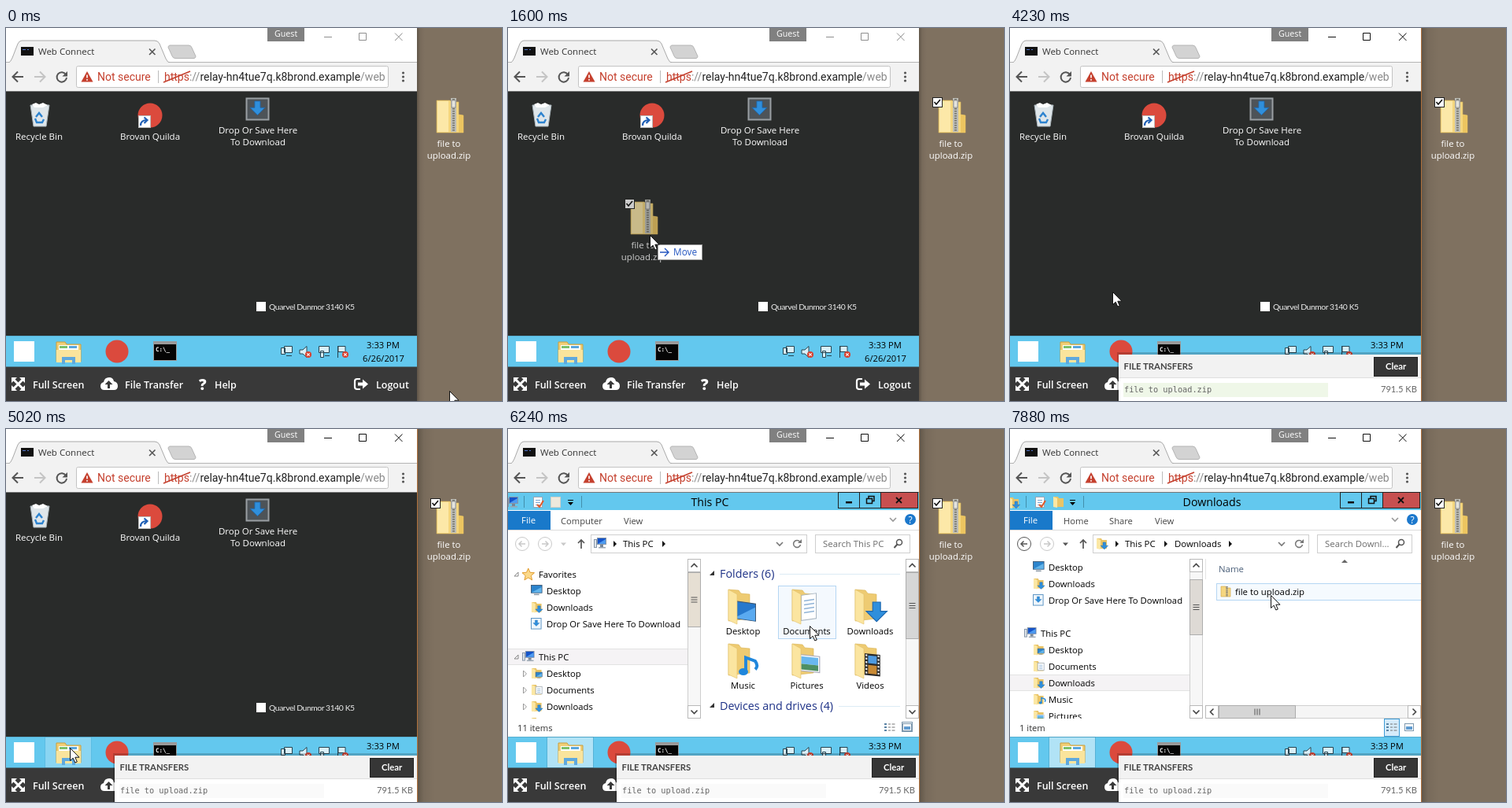
Recreate the animation shown at these times as an HTML page. Size 630 by 474 pixels, loop 8000 ms.

```html
<!DOCTYPE html>
<html lang="en">
<head>
<meta charset="utf-8">
<title>File transfer</title>
<style>
html, body { margin: 0; width: 100%; height: 100%; overflow: hidden; background: #7f7160; }
svg { display: block; width: 630px; height: 474px; }
text { font-family: "Open Sans", "Noto Sans", sans-serif; white-space: pre; }
.ui { font-family: Roboto, sans-serif; }
.lato { font-family: Lato, sans-serif; }
.mono { font-family: "DejaVu Sans Mono", monospace; }
</style>
</head>
<body>
<svg id="stage" viewBox="0 0 630 474" xmlns="http://www.w3.org/2000/svg"></svg>
<script>
const SKY = '#63c8ee', INK = '#000', DARK = '#393939';

const text = (x, y, s, fill = INK, size = 11.4, more = '') =>
  `<text x="${x}" y="${y}" fill="${fill}" font-size="${size}" ${more}>${s}</text>`;
const mid = (x, y, s, fill, size) => text(x, y, s, fill, size, 'text-anchor="middle"');
const rect = (x, y, w, h, fill, more = '') =>
  `<rect x="${x}" y="${y}" width="${w}" height="${h}" fill="${fill}" ${more}/>`;
const box = (x, y, w, h, fill, stroke, more = '') =>
  rect(x + .5, y + .5, w - 1, h - 1, fill, `stroke="${stroke}" ${more}`);
const shape = (d, fill, more = '') => `<path d="${d}" fill="${fill}" ${more}/>`;
const line = (d, stroke, w = 1, more = '') =>
  `<path d="${d}" fill="none" stroke="${stroke}" stroke-width="${w}" ${more}/>`;
const dot = (x, y, r, fill, more = '') => `<circle cx="${x}" cy="${y}" r="${r}" fill="${fill}" ${more}/>`;
const at = (x, y, s, k = 1) => `<g transform="translate(${x} ${y}) scale(${k})">${s}</g>`;
const group = (id, s, more = '') => `<g id="${id}" ${more}>${s}</g>`;

// Small pictures, drawn from their top left corner
const downArrow = shape('M5 0h6v7h5L8 15L0 7h5Z', '#2f8fdc', 'stroke="#1c66ae" stroke-width=".7"');
const note = line('M4 13V1l8 3q3 4 0 7', '#2087dc', 2.6) + `<ellipse cx="2" cy="13" rx="4" ry="3" fill="#2087dc"/>`;
const monitor = box(0, 0, 15, 11, '#2c84cc', '#44607c') + shape('M1 10L14 3V10Z', '#62b4ea') + rect(4, 12, 7, 1.5, '#8795a3');
const pc = box(4, 0, 12, 9, '#1553c8', '#8796a8') + shape('M5 8L15 2V8Z', '#4e9bf0') +
  rect(8, 9, 4, 3, '#788697') + rect(6, 12, 9, 1.5, '#9aa6b2') + box(0, 2, 4, 11, '#dfe5ea', '#8796a8');
const net = at(0, 0, pc, .9) + dot(10, 9, 5, '#3b92d6') + line('M6 8q4 4 8 0M10 4v10', '#9fd46c', 1.2);
const page = box(0, 0, 12, 14, '#fff', '#9aa7b5') + line('M3 4.5h6M3 7.5h6M3 10.5h6', '#7aa6d2');
const folderBack = shape('M1 1h6l1 2h6v11H1Z', '#e9c467') + shape('M1 1l5 2v12l-5-1Z', '#fbe7a4');
const film = rect(0, 0, 18, 25, '#2a2a2a') + rect(4, 2, 10, 9, '#4f9be0') + rect(4, 13, 10, 10, '#c98a34') +
  line('M2 1V25M16 1V25', '#eee', 2, 'stroke-dasharray="2 2"');
const photo = box(0, 0, 22, 18, '#fff', '#aab') + rect(2, 2, 18, 8, '#69b7ee') + rect(2, 10, 18, 6, '#4d8f63');
const star = shape('M8 0l2.3 5.4 5.7.5-4.3 3.8 1.3 5.7L8 12.3 3 15.4l1.3-5.7L0 5.9l5.7-.5Z', '#fbd98a', 'stroke="#e09a2c"');
const saveIcon = box(0, 0, 14, 15, '#eef6fc', '#5d95c4') + at(3, 3, downArrow, .52);
const small = {
  star, pc, net, monitor, save: saveIcon,
  desk: folderBack + at(6, 6, monitor, .6), docs: folderBack + at(6, 3, page, .75),
  down: folderBack + at(6, 6, downArrow, .6), music: folderBack + at(9, 5, note, .55),
  pics: folderBack + at(5, 6, photo, .45)
};
const folder = top => shape('M3 2l13 1 3 4 11 1v31L3 42Z', '#eecb72', 'stroke="#d9b253" stroke-width=".6"') +
  top + shape('M3 2l11 6v38L3 41Z', '#fbe5a0', 'stroke="#e3c26a" stroke-width=".6"');
const tinyZip = shape('M1 1h6l1 2h5v11H1Z', '#f5d67f', 'stroke="#cfa23e" stroke-width=".6"') +
  line('M8.5 1v13', '#777', 2.4, 'stroke-dasharray="1.5 1"');
const terminal = rect(0, 0, 30, 25, '#9a9a9a') + rect(1, 4, 28, 20, '#050505') +
  text(3, 12.5, 'C:\\_', '#fff', 7.5, 'class="mono" font-weight="700"');
const badge = (x, y) => dot(x, y, 4, '#d8402f') + line(`M${x - 1.7} ${y - 1.7}l3.4 3.4m0-3.4l-3.4 3.4`, '#fff', 1.2);

const zipFile = shape('M547 92h17l2 2h9v16l6 1v22h-34Z', '#f4d67e', 'stroke="#d9b75c" stroke-width=".6"') +
  shape('M548 93h14v39h-14Z', '#fce8a8') + shape('M575 110l6 1v22h-6Z', '#ecc560') +
  rect(565, 89, 7, 43, '#bdbdb6') + line('M568.5 90V132', '#77776f', 3, 'stroke-dasharray="1.5 1.5"') +
  rect(566, 92, 5, 9, '#e4e4de', 'stroke="#777" stroke-width=".7"') +
  mid(562.5, 151, 'file to', '#fff') + mid(562.5, 166, 'upload.zip', '#fff');
const tickMark = line('M541.5 94l2.5 3 5-6', '#111', 1.6);
const checkBox = box(539, 88, 13, 13, '#fff', '#222');

function browser() {
  const buttons = 'M404 11.5h10M448.5 6.5h9v9h-9ZM494 6.5l9.5 9.5m0-9.5l-9.5 9.5';
  return rect(0, 0, 522, 81, '#fff') +
    line('M0 43.5H522', '#b5b5b5') +
    shape('M3 44.5Q6 43 8 38L15 20Q17 16 20 16H189Q193 16 195 20L203 39Q205 44 209 44.5Z', '#f2f2f2', 'stroke="#a9a9a9"') +
    rect(0, 44, 522, 36, '#f2f2f2') + rect(0, 80, 522, 1, '#777') +
    shape('M208 22h24q3 0 4 3l5 11q0 2-2 2.5h-24q-3 0-4-3l-5-11q0-2 2-2.5Z', '#d3d3d3', 'stroke="#b4b4b4"') +
    at(19, 24, rect(0, 0, 16, 11, '#111') + line('M2 3.5h4M8 3.5h2', '#57c', 1)) +
    text(41, 34, 'Web Connect', '#333', 11.5) +
    line('M182 26.5l7.5 7.5m0-7.5l-7.5 7.5', '#555', 1.6) +
    rect(332, 0, 47, 17, '#808080') + text(341, 11, 'Guest', '#fff', 10.7) +
    line(buttons, '#8f8f8f', 1, 'id="caps"') +
    line('M22 62H9M15 55.5L8.5 62l6.5 6.5', '#555', 2) +
    line('M36 62H49M43 55.5L49.5 62l-6.5 6.5', '#c4c4c4', 2) +
    line('M76 59A6.2 6.2 0 1 0 77 63', '#555', 2) + shape('M78 55v6.5h-6.5Z', '#555') +
    box(89, 48, 397, 28, '#fff', '#c3c3c3', 'rx="2"') +
    shape('M103 55l7.5 13.5h-15Z', '#c5402e') + line('M103 59.5v4m0 1.5v1.8', '#fff', 1.6) +
    `<g clip-path="url(#urlClip)">` + text(116, 67, 'Not secure', '#c5402e', 14, 'class="ui"') +
    text(201, 67, '<tspan fill="#c5402e">https</tspan>://<tspan fill="#222">relay-hn4tue7q.k8brond.example</tspan>/web',
      '#8a8a8a', 14, 'class="ui"') + '</g>' +
    rect(193, 54, 1, 16, '#bbb') + line('M200 69L234 55', '#c5402e', 1.7) +
    [57, 62, 67].map(y => dot(504.5, y, 1.6, '#555')).join('');
}

function desktop() {
  const bin = shape('M31 98h24l-4 27h-16Z', '#dfe6ea', 'stroke="#a9b4ba"') + shape('M33 97l5-2 4 2 5-2 6 3-6 3H36Z', '#fff') +
    line('M38 113l4-5 4 5m-9 2l2 5h7l2-4', '#2d83cf', 2.4);
  const drop = box(305, 89, 29, 28, '#4d5358', '#9a9fa3', 'stroke-width="2"') + at(310, 93, downArrow, 1.18);
  return rect(0, 81, 522, 310, '#292b2a') + bin + mid(42, 142, 'Recycle Bin', '#fff', 11.5) +
    dot(183, 111, 15.5, '#db4a3d') + box(168, 111, 16, 16, '#fff', '#bbb') +
    line('M171 124q0-7 8-7m-3.5-3.5l4 3.5-4 4', '#1f5fb5', 2.2) +
    mid(183, 142, 'Brovan Quilda', '#fff', 11.5) + drop +
    mid(320, 134, 'Drop Or Save Here', '#fff', 11.5) + mid(320, 149, 'To Download', '#fff', 11.5) +
    rect(318, 348, 12, 12, '#fff') +
    text(334, 358, 'Quarvel Dunmor 3140 K5', '#eee', 10.4, 'class="lato" letter-spacing="-.45"');
}

function taskbar() {
  const tray = 'fill="#d9f0fa" stroke="#24424f"';
  return rect(0, 391, 522, 40, SKY) + rect(0, 391, 522, 1, '#58afd1') +
    group('task', box(49, 391, 60, 40, '#fff', '#2f8cb4', 'stroke-opacity=".8"')) +
    rect(10, 398, 26, 26, '#fff') +
    shape('M64 399h11l2 3h18v22H64Z', '#f0ce74', 'stroke="#c99f3f"') + rect(67, 403, 25, 8, '#fff') +
    rect(68, 404, 10, 3, '#7cc069') + rect(80, 404, 10, 3, '#5aa6dc') +
    shape('M64 409h31v16H64Z', '#fae49c') + shape('M71 427v-9h17v9h-4v-5h-9v5Z', '#5fa9dd') +
    dot(141, 411, 14.5, '#db4a3d') + at(187, 398, terminal) +
    shape('M349.5 406.5h5v8h-5ZM353.5 404.5h10v8h-10ZM356 416.5h7M373 409h4l5-4.5v14l-5-4.5h-4Z' +
      'M397.5 404.5h13v8h-13ZM399.5 410.5h4v8h-4ZM405 416.5h6M421.5 404v15M422 404.5h9v7h-9Z', '#d9f0fa', 'stroke="#24424f"') +
    badge(384, 415) + badge(431, 415) +
    mid(479, 407, '3:33 PM', INK, 11.2) + mid(479.5, 424, '6/26/2017', INK, 11.2);
}

function footer() {
  const label = (x, s) => text(x, 458, s, '#fff', 12.5, 'font-weight="600"');
  const corner = 'M7 444h7l-7 7Z';
  return rect(0, 430.5, 522, 43.5, DARK) +
    [0, 90, 180, 270].map(a => shape(corner, '#fff', `transform="rotate(${a} 15.5 452.5)"`)).join('') +
    line('M9.5 446.5l12 12m0-12l-12 12', '#fff', 3) + label(34, 'Full Screen') +
    shape('M125 460q-5 0-5-5 0-4 4-5 1-6 7-6 5 0 6 5 5 1 5 6t-5 5Z', '#fff') +
    shape('M130.5 448l5 5h-3.5v5h-3v-5h-3.5Z', DARK) + label(151, 'File Transfer') +
    text(245, 460, '?', '#fff', 19, 'font-weight="800"') + label(265, 'Help') +
    line('M450 446h-4q-3 0-3 3v7q0 3 3 3h4', '#fff', 2.2) +
    shape('M447 450.5h6v-4l7 6-7 6v-4h-6Z', '#fff') + label(470, 'Logout');
}

// Scroll bars of the file window
const grip = (x, y, side) => line(side ? `M${x - 3} ${y - 4}v8m3-8v8m3-8v8` : `M${x - 4} ${y - 3}h8m-8 3h8m-8 3h8`, '#555');
const chevron = (x, y, turn, color = '#444') =>
  line('M-4 2L0-2L4 2', color, 1.6, `transform="translate(${x} ${y}) rotate(${turn})"`);
function scroller(x, top, h, fill = '#d6d6d6') {
  return box(x, 165, 17, 203, '#f7f7f7', '#cfcfcf') + box(x, 165, 17, 17, '#fff', '#b9b9b9') +
    box(x, 351, 17, 17, '#fff', '#b9b9b9') + chevron(x + 8.5, 173.5, 0) + chevron(x + 8.5, 359.5, 180) +
    box(x, top, 17, h, fill, '#adadad') + grip(x + 8.5, top + h / 2, false);
}

const FAV = [[0, 'Favorites', 'star'], [1, 'Desktop', 'monitor'], [1, 'Downloads', 'down'], [1, 'Drop Or Save Here To Download', 'save'], null];
const MINE = [[0, 'This PC', 'pc'], [1, 'Desktop', 'desk'], [1, 'Documents', 'docs'], [1, 'Downloads', 'down'], [1, 'Music', 'music'], [1, 'Pictures', 'pics']];
const SHORT = [[0, 'This PC', 'pc'], null, [0, 'Network', 'net']];

function tree(rows, shift, picked) {
  const items = rows.map((row, i) => {
    if (!row) return '';
    const [deep, name, icon] = row, y = 185 + i * 21 - shift;
    return (i === picked ? box(-1, y - 11, 230, 21, '#f5f3f5', '#e3e3e3') : '') +
      at(deep ? 29 : 18, y - 8, small[icon], .97) + text(deep ? 49 : 39, y + 4, name, INK, 11.3);
  });
  return `<g clip-path="url(#treeClip)">${items.join('')}</g>`;
}

function fileWindow({ title, tabs, icon, crumbs, search, back, status, details }) {
  const nav = back ? '#555' : '#c9c9c9';
  const tri = x => shape(`M${x} 142l4 4-4 4Z`, '#111');
  return rect(0, 81, 522, 310, '#fff') + rect(0, 81, 522, 22, SKY) +
    at(-3, 86, small[icon]) + rect(20, 85, 1, 15, '#438fac') +
    at(32, 86, page) + line('M37 96l3 3 5-8', '#e0592a', 2) + at(54, 85, back ? folderBack : box(0, 1, 13, 14, '#eee9dc', '#d0d0c8')) +
    shape('M76 93h7l-3.5 4Z', INK) + rect(76, 90, 7, 1, INK) + rect(93, 85, 1, 15, '#438fac') +
    mid(256.5, 98, title, INK, 14.2) +
    box(419, 80, 28, 21, SKY, '#222') + box(446, 80, 28, 21, SKY, '#222') + box(473, 80, 48, 21, '#c75050', '#222') +
    rect(429, 92, 8, 2.5, '#111') + line('M455.5 88.5h7v6h-7ZM458 88v-2.5h7v6h-2', '#111', 1.5) +
    line('M493 87l7 7m0-7l-7 7', '#111', 1.8) +
    rect(0, 104, 54, 24, '#1979ca') + text(17, 120, 'File', '#fff') +
    tabs.map(([x, s]) => text(x, 121, s, '#444', 11.2)).join('') +
    chevron(489, 115, 180, '#999') + dot(511, 115, 7, '#1c78cc') + mid(511, 119.5, '?', '#fff', 12) +
    rect(0, 128, 522, 1, '#dcdcdc') +
    dot(18, 146, 8.5, '#fff', `stroke="${nav}"`) + line('M22 146h-8m3.5-3.5l-3.5 3.5 3.5 3.5', nav, 1.5) +
    dot(47, 146, 8.5, '#fff', 'stroke="#c9c9c9"') + line('M43 146h8m-3.5-3.5l3.5 3.5-3.5 3.5', '#c9c9c9', 1.5) +
    shape('M67 144.5h7l-3.5 4Z', nav) + line('M93 152v-11m-4 4l4-4 4 4', '#555', 1.7) +
    box(105, 134, 275, 24, '#fff', '#cfcfcf') + at(109, 138, small[icon]) + tri(134) +
    crumbs.map(([x, s, end]) => text(x, 150, s) + tri(end)).join('') +
    chevron(345, 146, 180, '#777') + line('M370.5 143a4.5 4.5 0 1 0 1 4', '#777', 1.5) + shape('M373 140v5h-5Z', '#777') +
    box(390, 134, 121, 24, '#fff', '#cfcfcf') + text(400, 150, search, '#6d6d6d') +
    dot(497, 144, 3.5, 'none', 'stroke="#555" stroke-width="1.5"') + line('M494.5 146.5l-4 4.5', '#555', 2) +
    text(12, 384, status, '#333', 11.2) +
    (details ? box(475, 368, 20, 23, '#d5ebfa', '#3d9bd5') : box(500, 372, 14, 13, '#fff', '#7c97ad')) +
    line('M478 375h3m-3 4h3m-3 4h3', '#5b83a5', 2) + line('M483 375h3m1.5 0h4m-8.5 4h3m1.5 0h4m-8.5 4h3m1.5 0h4', '#777') +
    box(501, 374, 12, 10, '#fff', '#7c97ad') + rect(503, 378, 8, 4, '#5f9bd0');
}

const HERE = { title: 'This PC', tabs: [[67, 'Computer'], [147, 'View']], icon: 'pc', crumbs: [[146, 'This PC', 196]], search: 'Search This PC' };

const emptyView = () => fileWindow({ ...HERE, status: '' }) + tree([...FAV, ...SHORT], 0, 5) + scroller(228, 218, 71) +
  text(331, 192, 'This folder is empty.', '#6d6d6d') +
  line('M505.5 182V351M521.5 165V351', '#cfcfcf') + box(505, 182, 17, 85, '#d6d6d6', '#adadad') + grip(513.5, 224.5, false);

function pcView() {
  const lean = (x, y, s, angle) => `<g transform="translate(${x} ${y}) skewY(${angle})">${s}</g>`;
  const tops = [
    ['Desktop', lean(11, 16, box(0, 0, 27, 23, '#2678cc', '#3f5872') + shape('M1 21L26 5V22H1Z', '#5aaaf0'), 8)],
    ['Documents', lean(14, 9, box(0, 0, 20, 33, '#fff', '#a9b6c2') + line('M4 8h13M4 13h13M4 18h13M4 23h13', '#8fb3d6', 1.5), -8)],
    ['Downloads', at(17, 18, downArrow, 1.65)],
    ['Music', at(19, 18, note, 1.5)],
    ['Pictures', lean(12, 15, at(0, 0, photo, 1.2), 6)],
    ['Videos', lean(15, 14, at(0, 0, film, 1.1), 6)]
  ];
  const head = (y, s, x) => shape(`M262 ${y - 9}v6h-6Z`, '#333') + text(269, y, s, '#1e3287', 14.3) + rect(x, y - 5, 498 - x, 1, '#dcebf5');
  const marks = line('M8 187h5v-5ZM8 292h5v-5Z', '#888') + [311, 332, 353].map(y => line(`M19.5 ${y - 4}l4 4-4 4Z`, '#999')).join('');
  return fileWindow({ ...HERE, status: '11 items' }) + tree([...FAV, ...MINE], 0, 5) + group('marks', marks) +
    scroller(228, 182, 70, '#e6dfd3') + head(189, 'Folders (6)', 345) +
    group('hover', box(0, 199, 74, 68, '#f4f9fe', '#b5d6f3')) +
    tops.map(([name, top], i) => {
      const col = i % 3, y = i < 3 ? 202 : 271;
      return at([277, 358, 438][col], y, folder(top)) + mid([298.5, 379.5, 460][col], y + 59, name, INK, 11.3);
    }).join('') +
    head(357, 'Devices and drives (4)', 420) + scroller(505, 182, 85);
}

const downloadsView = () => fileWindow({
  title: 'Downloads', tabs: [[68, 'Home'], [126, 'Share'], [184, 'View']], icon: 'down',
  crumbs: [[146, 'This PC', 196], [209, 'Downloads', 278]], search: 'Search Downl...', back: true, status: '1 item', details: true
}) + tree([...FAV, ...MINE], 30, 8) + scroller(228, 191, 71, '#dedad5') +
  text(265, 182, 'Name', '#4c607a') + shape('M421 170h8l-4-4Z', '#666') + rect(248, 165, 1, 26, '#e3e3e3') +
  group('list', group('rowHover', box(262, 196, 262, 22, '#f5fafe', '#b5d6f3')) + at(267, 199, tinyZip) + text(286, 211, 'file to upload.zip')) +
  box(248, 351, 274, 17, '#f5f5f5', '#cfcfcf') + box(248, 351, 17, 17, '#fff', '#b9b9b9') + box(505, 351, 17, 17, '#fff', '#b9b9b9') +
  chevron(256.5, 359.5, -90) + chevron(513.5, 359.5, 90) + box(265, 351, 98, 17, '#d6d6d6', '#adadad') + grip(314, 359.5, true);

const panel = () => rect(136, 412, 386, 64, '#000', 'opacity=".18"') + rect(138, 415, 384, 59, '#fff') +
  rect(138, 415, 384, 29, '#f2f2f2') + rect(138, 444, 384, 1, '#dedede') +
  text(144.5, 434, 'FILE TRANSFERS', '#444', 11.3, 'class="lato" font-weight="700"') +
  box(462, 418, 56, 25, '#363636', '#222') + text(477, 434, 'Clear', '#fff', 11.3, 'class="lato" font-weight="700"') +
  rect(144, 451, 260, 18, '#fafafa') + rect(144, 451, 260, 18, 'url(#stripes)', 'id="stripe"') +
  rect(144, 451, 0, 18, '#dff2cd', 'id="bar"') +
  text(145, 463, 'file to upload.zip', '#666', 10.25, 'class="mono"') +
  text(517, 463, '', '#666', 11.2, 'class="lato" text-anchor="end" id="size"');

const stage = document.getElementById('stage');
stage.innerHTML = `<defs>
  <clipPath id="urlClip"><rect x="90" y="49" width="392" height="26"/></clipPath>
  <clipPath id="treeClip"><rect x="0" y="165" width="228" height="203"/></clipPath>
  <clipPath id="winClip"><rect width="522" height="474"/></clipPath>
  <linearGradient id="fade"><stop stop-opacity=".25"/><stop offset=".4" stop-opacity=".06"/><stop offset="1" stop-opacity="0"/></linearGradient>
  <pattern id="stripes" width="14" height="14" patternUnits="userSpaceOnUse" patternTransform="rotate(45)">
    <rect width="7" height="14" fill="#ebebeb"/></pattern></defs>` +
  rect(0, 0, 630, 474, '#7f7160') + rect(522, 0, 10, 474, 'url(#fade)', 'id="shade"') +
  rect(522, 0, 1, 474, '#b0713c', 'id="edge"') +
  group('pick', rect(524, 86, 77, 86, '#fff', 'opacity=".16"')) + zipFile + group('check', checkBox + group('tick', tickMark)) +
  `<g clip-path="url(#winClip)">` + browser() + desktop() +
  group('empty', emptyView()) + group('pcv', pcView()) + group('dlv', downloadsView()) +
  taskbar() + footer() + group('panel', panel()) + '</g>' +
  group('ghost', zipFile + checkBox + tickMark, 'opacity=".76"') +
  group('cursor',
    group('tip', box(10, 12, 57, 20, '#fff', '#9a9a9a') + line('M13 22h11m-5-5l5 5-5 5', '#2456c0', 1.4) + text(30, 26, 'Move', '#2456c0', 11.8)) +
    shape('M.5 .5V16.5L4.2 13.2L6.8 19L9.3 18L6.8 12.2H12Z', '#fff', 'stroke="#111"'));

const el = {};
stage.querySelectorAll('[id]').forEach(n => el[n.id] = n);
const show = (id, on) => el[id].style.display = on ? '' : 'none';
const clamp = v => Math.max(0, Math.min(1, v));

// The picture only changes at these moments
const ticks = [0, 170, 370, 570, 770, 970, 1170, 1400, 1600, 1970, 2170, 2400, 3030, 3230, 3830, 4030, 4230, 4430,
  4620, 4820, 5020, 5420, 5640, 5840, 6040, 6240, 6460, 6660, 7060, 7260, 7480, 7680, 7880];
const path = [[0, 563, 461], [570, 571, 134], [770, 571, 134], [1170, 401, 215], [1400, 255, 245], [1600, 180, 263],
  [3630, 180, 263], [4820, 81, 405], [5420, 81, 405], [6240, 383, 250], [6460, 412, 246], [6660, 450, 238],
  [7060, 450, 238], [7880, 331, 211], [8000, 331, 211]];

function pointer(t) {
  const i = path.findIndex(p => p[0] > t), [t0, x0, y0] = path[i - 1], [t1, x1, y1] = path[i];
  const k = (t - t0) / (t1 - t0);
  return [x0 + (x1 - x0) * k, y0 + (y1 - y0) * k].map(Math.round);
}

function draw(time) {
  const t = ticks.filter(v => v <= time).pop();
  const [x, y] = pointer(t), active = t >= 1970, drag = t >= 970 && !active;
  el.cursor.setAttribute('transform', `translate(${x} ${y})`);
  el.ghost.setAttribute('transform', `translate(${x - 571} ${y - 134})`);
  show('ghost', drag);
  show('tip', drag);
  show('pick', t >= 570 && t < 970);
  show('check', t >= 570);
  show('tick', t >= 770);
  show('edge', active);
  el.shade.setAttribute('width', active ? 22 : 10);
  el.caps.setAttribute('stroke', active ? '#111' : '#8f8f8f');

  show('panel', t >= 2170);
  el.panel.setAttribute('transform', `translate(0 ${t < 2400 ? 30 : 0})`);
  const done = t < 3030 ? 0 : t < 3230 ? .1449 : 1;
  el.bar.setAttribute('width', 260 * done);
  el.bar.setAttribute('opacity', 1 - clamp((t - 3630) / 1000));
  show('stripe', done < 1);
  el.size.textContent = (done ? (791.5 * done).toFixed(1) : '0') + ' KB';

  show('task', t >= 4820);
  el.task.setAttribute('opacity', t < 5020 ? .15 : t < 5420 ? .25 : .5);
  show('empty', t >= 5420 && t < 5640);
  show('pcv', t >= 5640 && t < 7060);
  show('dlv', t >= 7060);
  show('marks', t < 6460);
  show('hover', t >= 6240);
  el.hover.setAttribute('transform', `translate(${t < 6660 ? 343 : 424} 0)`);
  show('list', t >= 7260);
  show('rowHover', y < 217);
}

function loop(now) {
  draw(now % 8000);
  requestAnimationFrame(loop);
}
draw(0);
requestAnimationFrame(loop);
</script>
</body>
</html>
```
